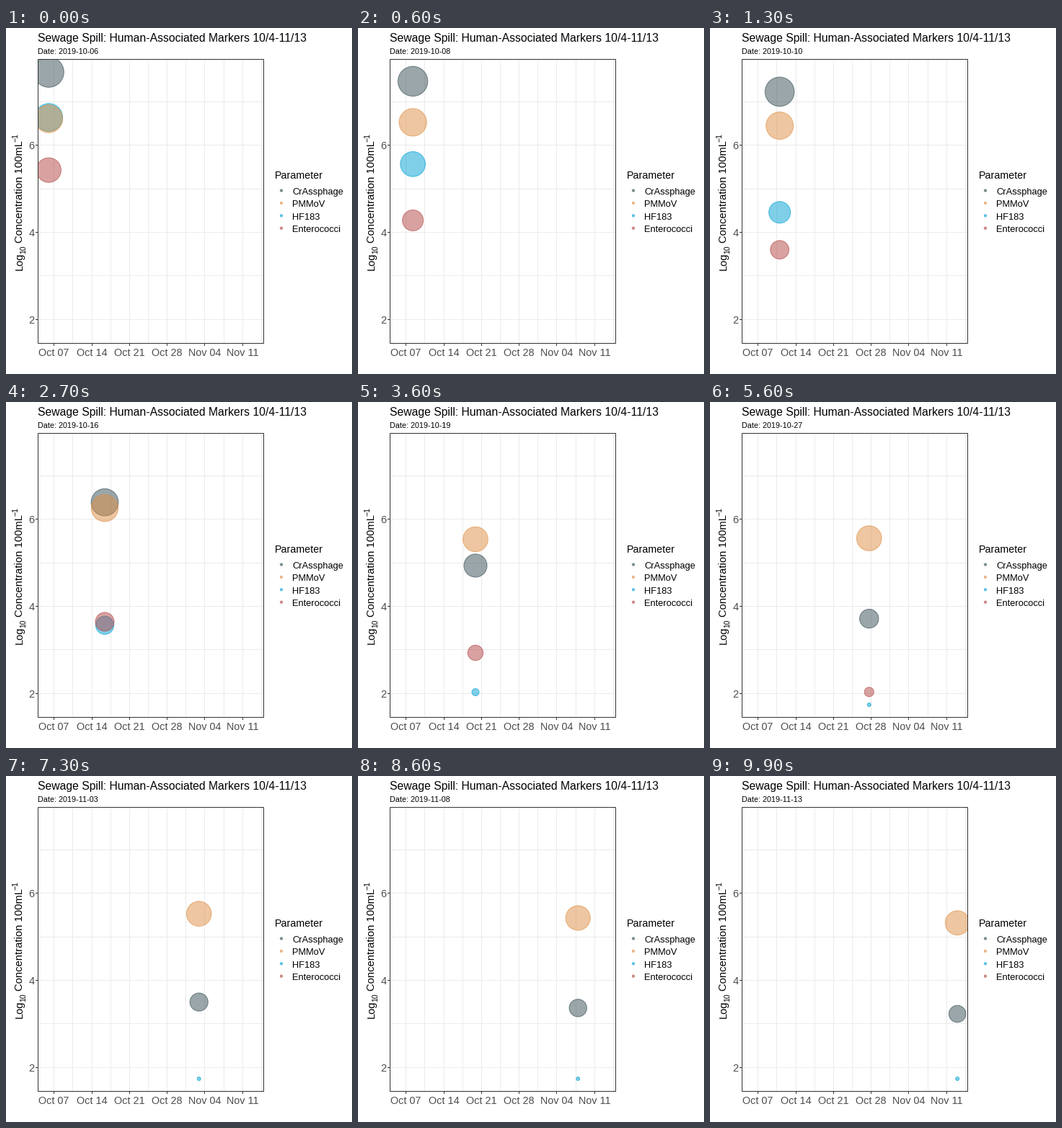
A matplotlib script for the animation above (10000 ms loop, 480x480 px).

```python
import numpy as np
import matplotlib.pyplot as plt
from matplotlib.animation import FuncAnimation
from matplotlib.patches import Circle, Rectangle

plt.rcParams["font.family"] = "Liberation Sans"
plt.rcParams["path.snap"] = False    # lines already sit on pixel centres

SIZE, DPI = 480, 72          # at 72 dpi one point is one pixel
FRAMES, SPAN = 100, 38       # SPAN: days from Oct 6 to Nov 13
LEFT, TOP, RIGHT, BOTTOM = 44.5, 43.5, 357.5, 437.5
V_MIN, V_MAX = 1.74, 7.68

# Sampling days after Oct 6 and log10 concentrations on those days
DAYS = np.array([0, 3, 5, 8, 10, 12, 15, 22, 29, 38])
SERIES = {
    "CrAssphage": ("#374E55", [7.68, 7.40, 7.23, 7.25, 6.58, 5.63, 4.52, 3.67, 3.47, 3.23]),
    "HF183": ("#00A1D5", [6.64, 5.21, 4.46, 4.14, 3.83, 2.51, 1.74, 1.74, 1.74, 1.74]),
    "PMMoV": ("#DF8F44", [6.61, 6.50, 6.45, 6.37, 6.33, 5.96, 5.29, 5.58, 5.52, 5.32]),
    "Enterococci": ("#B24745", [5.43, 3.89, 3.60, 2.76, 3.69, 3.47, 2.61, 2.00]),
}
LEGEND = ["CrAssphage", "PMMoV", "HF183", "Enterococci"]
KEYS = np.round(DAYS * (FRAMES - 1) / SPAN)


def px(day):
    return 59.3 + 7.471 * day


def py(value):
    return 404.3 - 60.4 * (value - 2)


def radius(value):
    """Area scale: radius follows the square root of the value."""
    return 2.5 + 18.5 * np.sqrt((np.asarray(value) - V_MIN) / (V_MAX - V_MIN))


fig = plt.figure(figsize=(SIZE / DPI, SIZE / DPI), dpi=DPI, facecolor="white")
ax = fig.add_axes([0, 0, 1, 1])
ax.set_xlim(0, SIZE)
ax.set_ylim(SIZE, 0)
ax.axis("off")


def line(x0, y0, x1, y1, color):
    ax.plot([x0, x1], [y0, y1], color=color, lw=1, solid_capstyle="butt", zorder=1)


def label(x, y, text, size, color="black", **kw):
    return ax.text(x, y, text, fontsize=size, color=color, va="baseline", **kw)


def dot(x, y, r, color):
    c = Circle((x, y), r, fc=(color, 0.5), ec=(color, 0.65), lw=1, zorder=3)
    return ax.add_patch(c)


def half(v):
    return np.floor(v) + 0.5


# Grid, ticks and axis labels
for k in range(12):
    x = half(px(1 + 3.5 * k))
    line(x, TOP, x, BOTTOM, "#EBEBEB")
for v in range(2, 8):
    y = half(py(v))
    line(LEFT, y, RIGHT, y, "#EBEBEB")
    if v % 2 == 0:
        line(41, y, 44, y, "#333333")
        label(39.5, y + 5.5, str(v), 14.6, "#4D4D4D", ha="right")
names = ["Oct 07", "Oct 14", "Oct 21", "Oct 28", "Nov 04", "Nov 11"]
for k, name in enumerate(names):
    x = half(px(1 + 7 * k))
    line(x, 438, x, 441, "#333333")
    label(x, 454.8, name, 14.4, "#4D4D4D", ha="center")

panel = Rectangle((LEFT, TOP), RIGHT - LEFT, BOTTOM - TOP, fill=False,
                  ec="#333333", lw=1, zorder=5)
ax.add_patch(panel)

# Titles
label(43.5, 19, "Sewage Spill: Human-Associated Markers 10/4-11/13", 15.8)
date = label(43.5, 36, "", 10.8)
for x, y, text, size in [(23.2, 336.5, "Log", 14.6), (27.2, 313, "10", 10.4),
                         (23.2, 298, "Concentration 100mL", 14.7),
                         (16.2, 157.5, "\u22121", 10.5)]:
    label(x, y, text, size, rotation=90, rotation_mode="anchor", ha="left")

# Legend
label(372.5, 209, "Parameter", 14.2)
for k, name in enumerate(LEGEND):
    y = 225.5 + 17.4 * k
    dot(382, y, 1.6, SERIES[name][0])
    label(397.5, y + 5.2, name, 12.9)

bubbles = []
for color, values in SERIES.values():
    bubble = dot(0, 0, 1, color)
    bubble.set_clip_path(panel)
    bubbles.append((bubble, np.array(values)))


def update(i):
    day = 6 + i * SPAN // (FRAMES - 1)
    month, day = (10, day) if day <= 31 else (11, day - 31)
    date.set_text(f"Date: 2019-{month}-{day:02d}")
    x = px(np.interp(i, KEYS, DAYS))
    for bubble, values in bubbles:
        keys = KEYS[:len(values)]
        bubble.set_visible(bool(i <= keys[-1]))
        bubble.center = x, py(np.interp(i, keys, values))
        bubble.set_radius(np.interp(i, keys, radius(values)))
    return [date] + [b for b, _ in bubbles]


anim = FuncAnimation(fig, update, frames=FRAMES, interval=100,
                     repeat=True, repeat_delay=0, blit=False)
plt.show()
```
